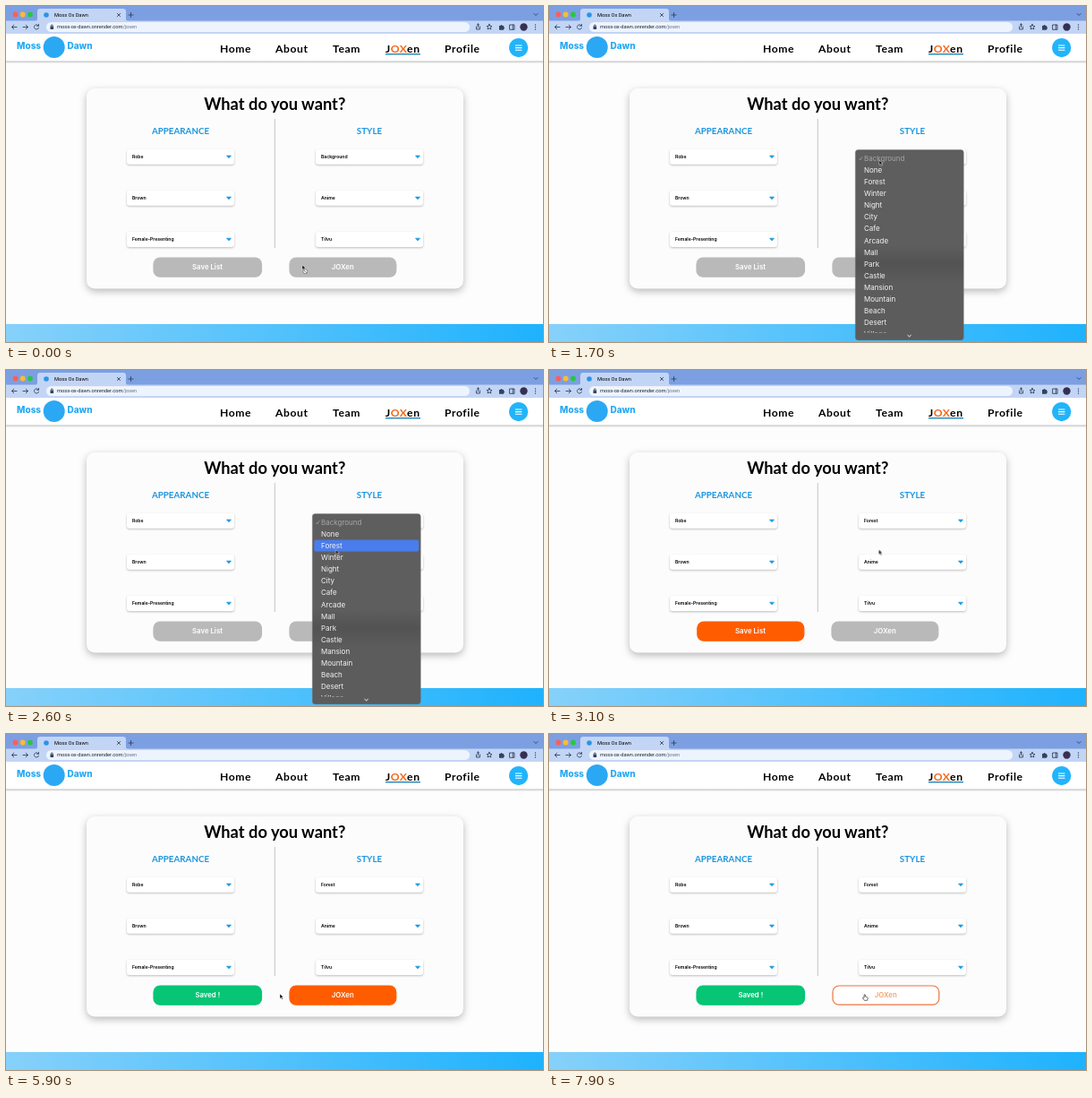
Animation, 600 px wide and 375 px high, one loop 8 s. Source, as an HTML page:

```html
<!DOCTYPE html>
<html lang="en">
<head>
<meta charset="utf-8">
<title>Moss Ox Dawn</title>
<style>
html, body { margin: 0; width: 100%; height: 100%; overflow: hidden; background: #fdfdfd; }
svg { display: block; width: 100%; height: 100%; }
text { font-family: Inter, sans-serif; }
.ui { font: 5.7px Roboto, sans-serif; }
.nav text { font: 700 12.2px Lato, sans-serif; letter-spacing: .55px; }
.title { font: 700 18.3px Lato, sans-serif; }
.section { font: 700 9.8px Lato, sans-serif; fill: #1c96df; }
.mid { text-anchor: middle; }
.logo { font-size: 10px; font-weight: 800; fill: #24a9f3; }
.value { font-size: 5.1px; font-weight: 600; }
.label { font-size: 7.8px; font-weight: 600; fill: #fff; }
.item { font-size: 8px; fill: #f4f4f4; }
.icon { fill: none; stroke: #33435f; stroke-width: .9; stroke-linecap: round; stroke-linejoin: round; }
.card { fill: #fcfcfc; filter: drop-shadow(0 3px 4px rgba(0,0,0,.27)); }
.select { fill: #fff; filter: drop-shadow(0 1px 1px rgba(0,0,0,.25)); }
.orange { fill: #f4691c; }

.step { animation: 8s step-end infinite; }
.blend { animation: 8s linear infinite; }

/* dropdown */
.menu { animation-name: menu; }
.row { animation-name: row; }
.before { animation-name: before; }
.after { animation-name: after; }
@keyframes menu { 0% { visibility: hidden } 11.25% { visibility: visible } 35%, 100% { visibility: hidden } }
@keyframes row { 0% { opacity: 0; transform: none } 22.6% { opacity: 1; transform: none } 24.3%, 100% { opacity: 1; transform: translateY(13.1px) } }
@keyframes before { 0% { visibility: visible } 35%, 100% { visibility: hidden } }
@keyframes after { 0% { visibility: hidden } 35%, 100% { visibility: visible } }

/* buttons */
.save { animation-name: save; }
.saveText { animation-name: saveText; }
.unsaved { animation-name: unsaved; }
.saved { animation-name: saved; }
.run { animation-name: run; }
.runText { animation-name: runText; }
.shift { animation-name: shift; }
.fit { animation-name: fit; }
@keyframes save {
  0%, 35% { fill: #b9b9b9; stroke: #b9b9b9 }
  37%, 53.2% { fill: #ff5c00; stroke: #ff5c00 }
  58%, 65% { fill: #fff; stroke: #f0641e }
  67%, 100% { fill: #06c575; stroke: #06c575 }
}
@keyframes saveText { 0%, 53.2% { fill: #fff } 58%, 65% { fill: #f6a26c } 67%, 100% { fill: #fff } }
@keyframes unsaved { 0% { visibility: visible } 65%, 100% { visibility: hidden } }
@keyframes saved { 0% { visibility: hidden } 65%, 100% { visibility: visible } }
@keyframes run {
  0%, 65% { fill: #b9b9b9; stroke: #b9b9b9 }
  67%, 89% { fill: #ff5c00; stroke: #ff5c00 }
  94%, 100% { fill: #fff; stroke: #ec7440 }
}
@keyframes runText { 0%, 89% { fill: #fff } 94%, 100% { fill: #f5a26e } }
@keyframes shift { 0% { transform: none } 35% { transform: translateX(-1px) } 65%, 100% { transform: none } }
@keyframes fit { 0% { x: 165px; width: 120.5px } 35% { x: 165.8px; width: 119px } 65%, 100% { x: 165px; width: 120.5px } }

/* pointer */
.pointer { animation: travel 8s ease-in-out infinite; }
.arrow { animation-name: arrow; }
.hand { animation-name: hand; }
.denied { animation-name: denied; }
@keyframes travel {
  0%, 5% { transform: translate(331px, 289px) }
  10%, 21% { transform: translate(369px, 172px) }
  27%, 45% { transform: translate(368.5px, 200.5px) }
  53.75% { transform: translate(280px, 286px) }
  59%, 66% { transform: translate(262px, 289px) }
  72%, 86% { transform: translate(306px, 290px) }
  95%, 100% { transform: translate(353px, 291px) }
}
@keyframes arrow { 0% { visibility: visible } 53.2% { visibility: hidden } 69% { visibility: visible } 89%, 100% { visibility: hidden } }
@keyframes hand { 0% { visibility: hidden } 53.2% { visibility: visible } 69% { visibility: hidden } 89%, 100% { visibility: visible } }
@keyframes denied { 0% { visibility: visible } 6%, 100% { visibility: hidden } }
</style>
</head>
<body>
<svg viewBox="0 0 600 375" preserveAspectRatio="none">
  <defs>
    <linearGradient id="sea"><stop stop-color="#86d1fa"/><stop offset="1" stop-color="#1fb2fd"/></linearGradient>
    <linearGradient id="haze" x2="0" y2="1"><stop offset=".5" stop-color="#5e5e5e"/><stop offset=".6" stop-color="#535353"/><stop offset=".7" stop-color="#5c5c5c"/></linearGradient>
    <linearGradient id="shade" x2="0" y2="1"><stop stop-color="#bdbdbd"/><stop offset="1" stop-color="#fdfdfd"/></linearGradient>
    <clipPath id="menuClip"><path d="M342 160h122v204.5h-122z"/></clipPath>
  </defs>
  <rect width="600" height="375" fill="#fdfdfd"/>

  <g id="browser">
    <rect width="600" height="17" fill="#7c9fe2"/>
    <path d="M32 17q3 0 3-3V6q0-3 3-3h93q3 0 3 3v8q0 3 3 3z" fill="#c3d5f5"/>
    <rect y="16.5" width="600" height="14.5" fill="#c3d5f5"/>
    <circle cx="10.5" cy="9.5" r="2.9" fill="#ff5f57"/>
    <circle cx="18.7" cy="9.5" r="2.9" fill="#febc2e"/>
    <circle cx="27" cy="9.5" r="2.9" fill="#28c840"/>
    <circle cx="45" cy="10" r="2.8" fill="#2a94ea"/>
    <text class="ui" x="54" y="12">Moss Ox Dawn</text>
    <rect x="45" y="18" width="473" height="11" rx="5.5" fill="#eef4fd"/>
    <path class="icon" d="M124.4 8.4l3.2 3.2m0-3.2l-3.2 3.2M137 10h5m-2.5-2.5v5M590 8.5l2 2 2-2
      M12 23.5H6.5m2.3-2.3l-2.3 2.3 2.3 2.3M19 23.5h5.5m-2.3-2.3l2.3 2.3-2.3 2.3
      M36.3 22a2.6 2.6 0 1 0 .2 2.5M36.5 20.5v1.8h-1.8
      M525.5 23v3h4v-3M527.5 24v-4m-1.3 1.2l1.3-1.2 1.3 1.2
      M540 20.3l.9 2 2.1.2-1.6 1.4.5 2.1-1.9-1.1-1.9 1.1.5-2.1-1.6-1.4 2.1-.2z
      M563 21h5v5.3h-5zM566.3 21v5"/>
    <path d="M49.5 22.8h3.6v3.2h-3.6zM551 22h1.5a1 1 0 0 1 2 0h1.6v1.5a1 1 0 0 1 0 2v1.2H551z" fill="#33435f"/>
    <path class="icon" d="M50.3 22.8v-.8a1 1 0 0 1 2 0v.8"/>
    <text class="ui" x="57" y="25.4" fill="#1c2431">moss-ox-dawn.onrender.com<tspan fill="#68748a">/joxen</tspan></text>
    <circle cx="578.5" cy="23.5" r="4.2" fill="#353052"/>
    <g fill="#33435f"><circle cx="591.5" cy="21" r=".7"/><circle cx="591.5" cy="23.5" r=".7"/><circle cx="591.5" cy="26" r=".7"/></g>
  </g>

  <g id="header">
    <rect y="31" width="600" height="31" fill="#fff"/>
    <rect y="61.5" width="600" height="2.5" fill="url(#shade)"/>
    <text class="logo" x="12" y="48.3">Moss</text>
    <circle cx="53.7" cy="46" r="12" fill="#2ba8f4"/>
    <text class="logo" x="68.5" y="48.3">Dawn</text>
    <g class="nav">
      <text x="239" y="52">Home</text>
      <text x="301" y="52">About</text>
      <text x="365" y="52">Team</text>
      <text x="424" y="52">J<tspan class="orange">OX</tspan>en</text>
      <text x="490" y="52">Profile</text>
    </g>
    <rect x="424" y="53" width="39" height="1.4" fill="#1b86c4"/>
    <circle cx="572.7" cy="46.6" r="10.6" fill="#22b4fb"/>
    <path d="M569 44h7.4m-7.4 2.6h7.4m-7.4 2.6h7.4" stroke="#fff" stroke-width="1.1"/>
  </g>

  <rect class="card" x="90" y="92" width="421" height="223.5" rx="9"/>
  <text class="title mid" x="300.3" y="116.3">What do you want?</text>
  <text class="section mid" x="195" y="143.3">APPEARANCE</text>
  <text class="section mid" x="406" y="143.3">STYLE</text>
  <path d="M300.3 126v144" stroke="#c3c3c3"/>
  <g id="selects"></g>

  <g stroke-width="1.2">
    <rect class="save blend" x="165" y="281" width="120.5" height="21.2" rx="7" id="saveBox"/>
    <g class="step shift"><rect class="run blend" x="317" y="281" width="118.8" height="21.2" rx="7"/></g>
  </g>
  <g class="step unsaved"><text class="label mid blend saveText" x="225" y="293.6">Save List</text></g>
  <text class="label mid step saved" x="225.3" y="293.6">Saved !</text>
  <g class="step shift"><text class="label mid blend runText" x="376.3" y="293.6">JOXen</text></g>

  <rect y="355" width="600" height="20" fill="url(#sea)"/>

  <g class="step menu">
    <rect x="342.3" y="160.5" width="121" height="212.5" rx="3.2" fill="url(#haze)" stroke="#777" stroke-width=".4"/>
    <g class="step row"><rect x="344.3" y="176.4" width="117" height="13" rx="1.8" fill="#4a7cec"/></g>
    <g id="items" clip-path="url(#menuClip)"></g>
    <path d="M346.6 170.3l1.2 1.6 2.2-3.7" fill="none" stroke="#a5a5a5" stroke-width=".8"/>
    <path d="M400.6 367.2l2 1.8 2-1.8" fill="none" stroke="#fff"/>
  </g>

  <g class="pointer">
    <g class="step arrow">
      <path d="M0 0v5.4l1.3-1.2 1 2.1 1-.5-1-2h1.7z" stroke="#fff" stroke-width=".5"/>
      <g class="step denied">
        <circle cx="3.4" cy="7.3" r="2.5" fill="#eee" stroke="#777" stroke-width=".8"/>
        <path d="M1.7 5.6l3.4 3.4" stroke="#777" stroke-width=".8"/>
      </g>
    </g>
    <path class="step hand" d="M-.9 0q.7-.8 1.3 0v2l2.3.7q.7.3.5 1.2l-.5 2.4h-3.4l-2-2.8q.2-1 1.8-.1z" fill="#fff" stroke="#222" stroke-width=".65"/>
  </g>
</svg>
<script>
const add = (id, markup) => document.getElementById(id).insertAdjacentHTML('beforeend', markup);

const select = (x, y, value) => `
  <rect class="select" x="${x}" y="${y - 8.3}" width="120" height="16.8" rx="3"/>
  <path d="M${x + 111.5} ${y - 1.2}h5l-2.5 2.8z" fill="#1c9be4" stroke="#1c9be4" stroke-width=".7" stroke-linejoin="round"/>
  ${value ? `<text class="value" x="${x + 6}" y="${y + 1.9}">${value}</text>` : ''}`;

const columns = [[135, ['Robe', 'Brown', 'Female-Presenting']], [346, ['', 'Anime', 'Tilvu']]];
for (const [x, values] of columns)
  values.forEach((value, i) => add('selects', select(x, 168.2 + i * 46.1, value)));
add('selects', `<text class="value step before" x="352" y="170.1">Background</text>
  <text class="value step after" x="352" y="170.1">Forest</text>`);

const places = ['Background', 'None', 'Forest', 'Winter', 'Night', 'City', 'Cafe', 'Arcade', 'Mall',
  'Park', 'Castle', 'Mansion', 'Mountain', 'Beach', 'Desert', 'Village'];
places.forEach((place, i) => add('items',
  `<text class="item" x="352" y="${172.8 + i * 13.1}"${i ? '' : ' style="fill:#a5a5a5"'}>${place}</text>`));

// The first button changes size in step while its colour blends.
document.getElementById('saveBox').style.animation = 'save 8s linear infinite, fit 8s step-end infinite';
</script>
</body>
</html>
```
